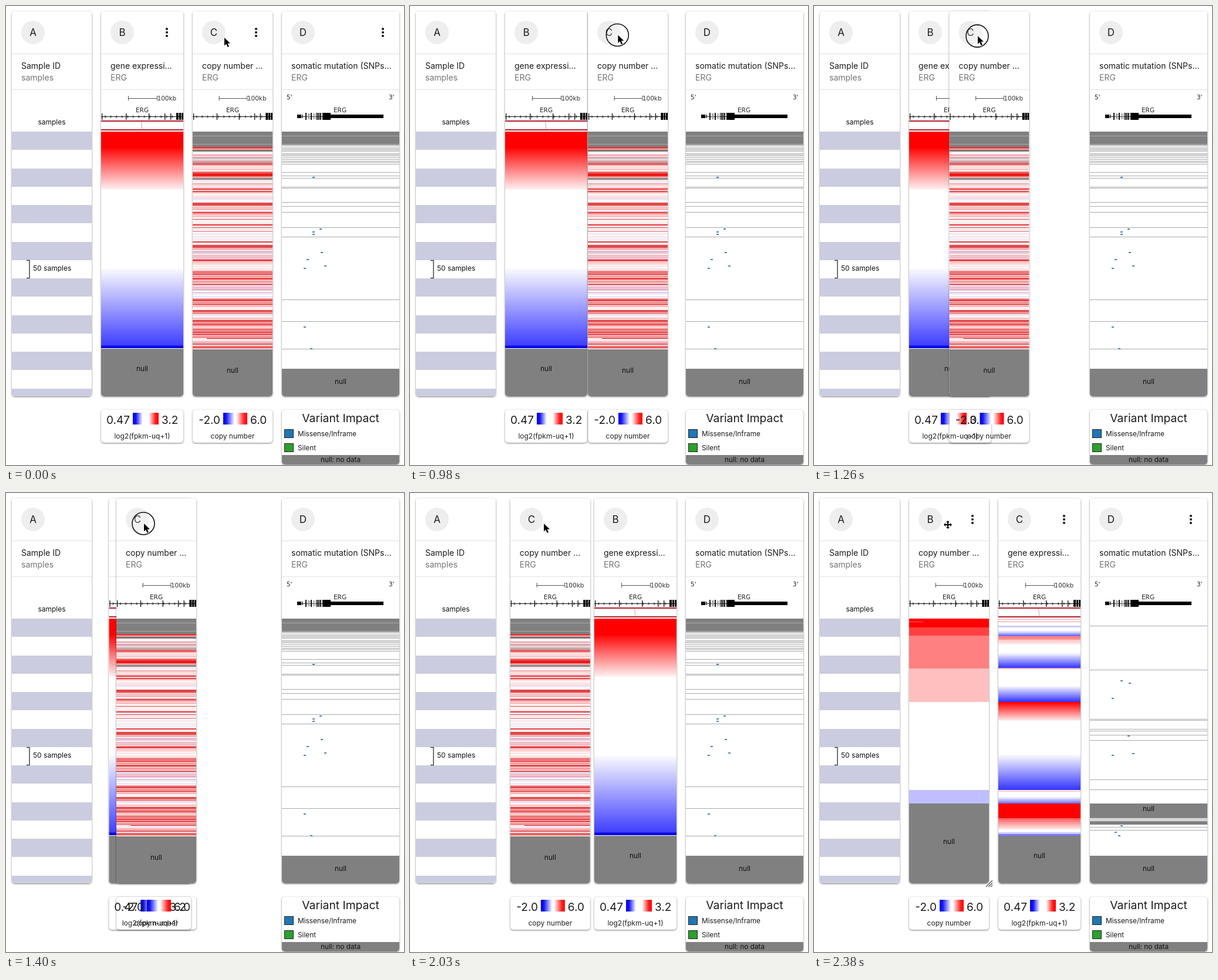
Write an HTML page with a canvas that moves like this. It is 678 by 782 pixels and loops after 3.64 s.

```html
<!DOCTYPE html>
<html lang="en">
<head>
<meta charset="utf-8">
<title>Column reorder</title>
<style>
html, body { margin: 0; width: 100%; height: 100%; overflow: hidden; background: #fff; }
canvas { display: block; }
</style>
</head>
<body>
<canvas id="stage" width="678" height="782"></canvas>
<script>
const ctx = document.getElementById('stage').getContext('2d');
const LOOP = 3640, STEP = 70;
const UI = 'Inter, Roboto, sans-serif', PLOT = '"DejaVu Sans", sans-serif';
const GRAY = '#808080', TOP = 9, BOTTOM = 665, DATA = 214;

const rect = (x, y, w, h, c) => { ctx.fillStyle = c; ctx.fillRect(x, y, w, h); };

function text(s, x, y, size, color = '#1c1c1c', align = 'left', font = UI) {
  ctx.font = `${size}px ${font}`;
  ctx.textAlign = align;
  ctx.fillStyle = color;
  ctx.fillText(s, x, y);
}

function disc(x, y, r, c) {
  ctx.fillStyle = c;
  ctx.beginPath();
  ctx.arc(x, y, r, 0, 7);
  ctx.fill();
}

function line(points, color, width = 1) {
  ctx.strokeStyle = color;
  ctx.lineWidth = width;
  ctx.beginPath();
  points.forEach(([x, y]) => ctx.lineTo(x, y));
  ctx.stroke();
}

// -1 is blue, 0 is white, 1 is red
function tone(v) {
  const c = Math.round(255 * (1 - Math.min(1, Math.abs(v))));
  return v < 0 ? `rgb(${c},${c},255)` : `rgb(255,${c},${c})`;
}

function bands(list, x, w) {
  for (const [a, b, from, to = from] of list) {
    const step = from === to ? b - a : 3;
    for (let y = a; y < b; y += step)
      rect(x, y, w, Math.min(step, b - y), tone(from + (to - from) * (y - a) / (b - a)));
  }
}

function lerpKeys(keys, t) {
  if (t <= keys[0][0]) return keys[0][1];
  for (let i = 1; i < keys.length; i++) {
    const [t0, v0] = keys[i - 1], [t1, v1] = keys[i];
    if (t <= t1) return v0 + (v1 - v0) * (t - t0) / (t1 - t0);
  }
  return keys[keys.length - 1][1];
}

// cubic-bezier(.25, .1, .25, 1)
function ease(x) {
  if (x <= 0) return 0;
  if (x >= 1) return 1;
  const curve = (s, a, b) => 3 * s * (1 - s) ** 2 * a + 3 * s * s * (1 - s) * b + s ** 3;
  let lo = 0, hi = 1;
  for (let i = 0; i < 24; i++) {
    const mid = (lo + hi) / 2;
    if (curve(mid, .25, .25) < x) lo = mid; else hi = mid;
  }
  return curve(lo, .1, 1);
}

function shadow(x, y, w, h) {
  ctx.save();
  ctx.beginPath();
  ctx.rect(x - 8, y - 8, w + 16, h + 16);
  ctx.roundRect(x, y, w, h, 5);
  ctx.clip('evenodd');
  ctx.shadowColor = 'rgba(0,0,0,.5)';
  ctx.shadowBlur = 3;
  ctx.shadowOffsetY = 1;
  ctx.fillStyle = '#ddd';
  ctx.beginPath();
  ctx.roundRect(x, y, w, h, 5);
  ctx.fill();
  ctx.restore();
}

function card(x, w, letter, title, sub, menu, body) {
  shadow(x, TOP, w, BOTTOM - TOP);
  ctx.save();
  ctx.beginPath();
  ctx.roundRect(x, TOP, w, BOTTOM - TOP, 5);
  ctx.clip();
  rect(x, TOP, w, BOTTOM - TOP, '#fff');
  disc(x + 36, 45, 20, '#eee');
  text(letter, x + 36, 51, 17, '#1c1c1c', 'center');
  if (menu) for (const y of [39, 45, 51]) disc(x + w - 28, y, 2.1, '#1c1c1c');
  rect(x, 81, w, 1, '#e2e2e2');
  rect(x, 142, w, 1, '#e2e2e2');
  text(title, x + 16, 107, 14);
  text(sub, x + 16, 127, 14, '#757575');
  body(x, w);
  ctx.restore();
}

function axis(x, w) {
  const k = w / 140, at = p => x + p * k;
  rect(at(46), 157, 49 * k, 1, '#555');
  rect(at(46), 153, 1, 8, '#555');
  rect(at(95), 153, 1, 8, '#555');
  text('100kb', at(95.5), 161, 10.5, '#333', 'left', PLOT);
  text('ERG', at(70), 181, 10.5, '#222', 'center', PLOT);
  rect(x, 188, w, 1, '#111');
  for (let p = 8; p < 126; p += 9.5)
    line([[at(p) - 2, 186.5], [at(p) + 1, 188.5], [at(p) - 2, 190.5]], '#333');
  for (const p of [1, 42, 81, 108, 118]) rect(at(p), 183, 1.3, 11, '#111');
  for (const [p, n] of [[128, 4], [133, 3], [137, 3]]) rect(at(p), 182, n, 12, '#000');
}

function samples(x, w) {
  text('samples', x + w / 2, 202, 12, '#111', 'center');
  for (let y = DATA; y < BOTTOM; y += 62.5) rect(x, Math.round(y), w, 31, '#cccce0');
  line([[x + 25, 433.5], [x + 30, 433.5], [x + 30, 463.5], [x + 25, 463.5]], '#444', 1.5);
  text('50 samples', x + 36, 451, 12, '#111');
}

const EXPR = [[214, 243, 1], [243, 313, .94, .03], [448, 578, -.03, -.76], [578, 580, -.9]];
const EXPR_SORTED = [
  [215, 216, .35], [219, 220, .4], [226, 229, -.2, -.7], [235, 244, -.12, -.75],
  [244, 250, .5, .38], [250, 258, .2, .04], [272, 298, -.04, -.85], [298, 300, .3],
  [330, 356, -.1, -.85], [356, 388, .98, .03], [446, 506, -.03, -.82], [507, 509, .2],
  [518, 529, -.1, -.65], [529, 554, 1], [554, 573, .6, .04], [578, 584, -.2, -.85]];

function expression(x, w, sorted) {
  axis(x, w);
  rect(x, 195, w, 2, '#b3202a');
  rect(x, 210, w, 2, '#b3202a');
  line([[x + w * .49, 197], [x + w * .5, 210]], '#e09aa0');
  bands(sorted ? EXPR_SORTED : EXPR, x, w);
  if (!sorted) rect(x, 580, w, 3, '#0000d8');
  rect(x, 584, w, 90, GRAY);
  text('null', x + w / 2, 622, 12, '#111', 'center');
}

function stripes(x, w) {
  let seed = 91;
  const rnd = () => (seed = (seed * 16807) % 2147483647) / 2147483647;
  const pale = [[250, 264], [297, 309], [320, 333], [378, 399], [442, 450], [485, 498]];
  for (let y = 241; y < 584;) {
    const h = rnd() < .45 ? 2 : 1, r = rnd(), d = rnd();
    const light = pale.some(([a, b]) => y >= a && y < b);
    const mauve = y > 416 && y < 430 || y > 474 && y < 488;
    let c;
    if (y < 272 && d < .3) c = '#a5a0a2';
    else if (mauve && d < .5) c = '#e2c8e2';
    else if (r < .28) c = light ? '#fff' : '#fff0f0';
    else if (r < .4) c = '#ebe8fa';
    else if (r < .66) c = tone(light ? .1 : .28);
    else if (r < .88) c = light ? '#fbd8dc' : '#f38f91';
    else c = light ? '#eba4a8' : '#df4a4c';
    rect(x, y, w, h, c);
    y += h;
  }
  rect(x, DATA, w, 26, GRAY);
  rect(x, 221, w, 1, '#aaa');
  rect(x, 235, w, 1, '#aaa');
  rect(x, 240, w, 2, '#d93c3e');
  rect(x, 245, w, 3, '#777');
  rect(x, 283, w, 2, '#ee4a4a');
  rect(x, 286, w, 4, '#f01414');
  rect(x, 293, w, 3, '#858080');
  for (const y of [311, 335, 338, 372, 401, 407, 432, 463, 500, 541, 559, 580]) rect(x, y, w, 2, '#e24648');
  rect(x, 566, 24, 1, '#fff');
  rect(x + 24, 566, w - 24, 1, '#c8282c');
}

function copies(x, w, sorted) {
  axis(x, w);
  if (sorted) {
    bands([[214, 229, 1], [229, 243, .75], [243, 299, .5], [299, 356, .25], [506, 529, -.25]], x, w);
    rect(x, 219, 24, 1, '#ff6060');
  } else stripes(x, w);
  const top = sorted ? 529 : 585;
  rect(x, top, w, BOTTOM - top, GRAY);
  text('null', x + w / 2, sorted ? 598 : 625, 12, '#111', 'center');
}

const ROWS = [238, 241, 243, 245, 247, 251, 253, 255, 258, 261, 264, 266, 269, 283, 289, 293,
  308, 310, 334, 341, 351, 377, 393, 500, 537, 584];
const ROWS_SORTED = [226, 301, 385, 387, 402, 405, 412, 421, 488, 505, 555, 557, 569, 574];
const HITS = [[54, 292], [66, 380], [54, 385], [54, 389], [68, 420], [44, 432], [39, 447],
  [74, 443], [39, 547], [50, 584]];
const HITS_SORTED = [[54, 320], [68, 324], [39, 350], [66, 414], [39, 447], [74, 444],
  [54, 567], [44, 578], [50, 584]];

function mutations(x, w, sorted) {
  text("5'", x + 8, 159, 10.5, '#222', 'left', PLOT);
  text("3'", x + 182, 159, 10.5, '#222', 'left', PLOT);
  text('ERG', x + 99, 181, 10.5, '#222', 'center', PLOT);
  rect(x + 26, 188, 50, 1, '#333');
  rect(x + 26, 185, 7, 6, '#000');
  rect(x + 34, 185, 2, 6, '#555');
  for (const p of [40, 49, 59, 62, 65]) rect(x + p, 182, 2, 12, '#111');
  for (const p of [44, 46, 53, 56]) rect(x + p, 183, 1.5, 10, '#999');
  rect(x + 69, 182, 14, 12, '#000');
  rect(x + 83, 185, 90, 6, '#000');

  for (const y of sorted ? ROWS_SORTED : ROWS) rect(x, y, w, 1, '#aaa');
  if (sorted) {
    rect(x, 529, w, 25, GRAY);
    rect(x, 559, w, 6, GRAY);
    text('null', x + w / 2, 542, 12, '#111', 'center');
  } else {
    rect(x, DATA, w, 23, GRAY);
    rect(x, 221, w, 1, '#aaa');
    rect(x, 235, w, 1, '#aaa');
  }
  for (const [px, y] of sorted ? HITS_SORTED : HITS) rect(x + px - 2, y - 1, 4, 2, '#4a84b4');
  rect(x, 618, w, 48, GRAY);
  text('null', x + w / 2, 644, 12, '#111', 'center');
}

function scaleKey(x, w, low, high, label, from, size, stops) {
  shadow(x, 688, w, 56);
  const g = ctx.createLinearGradient(x + from, 0, x + from + size, 0);
  g.addColorStop(0, '#0000ee');
  g.addColorStop(.12, '#1414f0');
  g.addColorStop(stops[0], '#fff');
  g.addColorStop(stops[1], '#fff');
  g.addColorStop(.88, '#ff1c1c');
  g.addColorStop(1, '#f00');
  rect(x + from, 693, size, 20, g);
  text(low, x + from - 5, 712, 19, '#1c1c1c', 'right');
  text(high, x + from + size + 5, 712, 19);
  text(label, x + w / 2, 737, 12, '#222', 'center');
}

function impactKey(x) {
  shadow(x, 688, 200, 93);
  text('Variant Impact', x + 100, 709, 19.3, '#1c1c1c', 'center');
  [['#1f77b4', 'Missense/Inframe', 722], ['#2ca02c', 'Silent', 746]].forEach(([c, s, y]) => {
    rect(x + 4, y - 1, 16, 15, '#222');
    rect(x + 5, y, 14, 13, c);
    text(s, x + 27, y + 11, 11.8);
  });
  ctx.fillStyle = GRAY;
  ctx.beginPath();
  ctx.roundRect(x, 765, 200, 16, [0, 0, 5, 5]);
  ctx.fill();
  text('null: no data', x + 100, 777, 11.8, '#111', 'center');
}

function outlined(path, x, y) {
  ctx.save();
  ctx.translate(x, y);
  const p = new Path2D(path);
  ctx.lineJoin = 'round';
  ctx.lineWidth = 2;
  ctx.strokeStyle = '#fff';
  ctx.stroke(p);
  ctx.fillStyle = '#000';
  ctx.fill(p);
  ctx.restore();
}
const arrow = (x, y) => outlined('M0 0V13.5L3.2 10.6L5.6 16L8 15L5.6 9.7H10Z', x, y);
const mover = (x, y) => outlined('M0-7L3-4H1V-1H4V-3L7 0L4 3V1H1V4H3L0 7L-3 4H-1V1H-4V3L-7 0L-4-3V-1H-1V-4H-3Z', x, y);

function press(x, y) {
  ctx.beginPath();
  ctx.arc(x, y, 19, 0, 7);
  ctx.fillStyle = 'rgba(255,255,255,.2)';
  ctx.fill();
  ctx.strokeStyle = '#111';
  ctx.lineWidth = 1.6;
  ctx.stroke();
}

function grip(right) {
  for (const d of [11, 7, 3]) line([[right + 6 - d, 671], [right + 6, 671 - d]], '#555', 1.2);
}

const DRAG = [[910, 318], [1120, 273], [1400, 188], [1470, 177]];
const POINTER = [[910, 370], [1120, 323], [1400, 235], [1470, 228]];

function draw(t) {
  const dragging = t >= 980 && t < 2310, swapped = t >= 2310, sorted = t >= 2380;
  const menu = !dragging;
  const bx = 162 + 152 * ease((t - 1360) / 420);
  const cx = lerpKeys(DRAG, t) - 15 * ease((t - 1930) / 400);

  rect(0, 0, 678, 782, '#fff');
  card(10, 136, 'A', 'Sample ID', 'samples', false, samples);
  card(470, 200, 'D', 'somatic mutation (SNPs…', 'ERG', menu, (x, w) => mutations(x, w, sorted));
  impactKey(470);
  card(bx, 140, swapped ? 'C' : 'B', 'gene expressi…', 'ERG', menu, (x, w) => expression(x, w, sorted));
  scaleKey(bx, 140, '0.47', '3.2', 'log2(fpkm-uq+1)', 54, 44, [.38, .62]);
  card(cx, 136, swapped ? 'B' : 'C', 'copy number …', 'ERG', menu, (x, w) => copies(x, w, sorted));
  scaleKey(cx, 136, '-2.0', '6.0', 'copy number', 52, 41, [.47, .55]);

  const px = lerpKeys(POINTER, t), py = lerpKeys([[910, 49], [1400, 52]], t);
  if (t >= 630 && t < 1890) press(px - 1, py);
  if (t < 70) arrow(372, 54);
  else if (t < 980) {
    grip(cx + 136);
    mover(370, lerpKeys([[70, 52], [210, 50]], t));
  } else if (!sorted) arrow(px, py);
  else {
    grip(cx + 136);
    mover(228, 54);
  }
}

const start = performance.now();
function tick() {
  const t = (performance.now() - start) % LOOP;
  draw(Math.floor(t / STEP) * STEP);
  requestAnimationFrame(tick);
}
tick();
</script>
</body>
</html>
```
